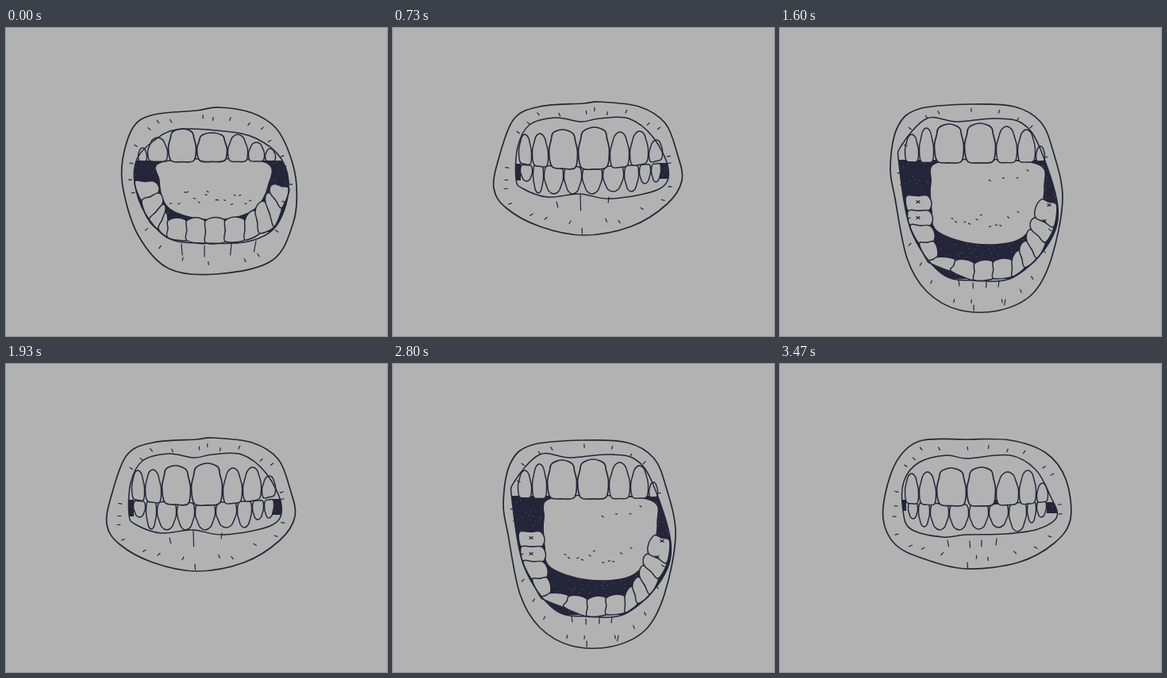
Recreate the animation shown at these times as an HTML page with a canvas. Size 480 px wide and 388 px high, loop 3540 ms.

```html
<!DOCTYPE html>
<html lang="en">
<head>
<meta charset="utf-8">
<title>Mouth</title>
<style>
html, body { margin: 0; width: 100%; height: 100%; overflow: hidden; background: #b2b2b2; }
canvas { display: block; width: 480px; height: 388px; }
</style>
</head>
<body>
<canvas id="stage" width="480" height="388"></canvas>
<script>
const PAPER = '#b2b2b2', INK = '#25253a';
const ctx = document.getElementById('stage').getContext('2d');
ctx.lineCap = ctx.lineJoin = 'round';
let seed = 1;
const rnd = () => (seed = seed * 16807 % 2147483647) / 2147483647;
const mix = (a, b, t) => a + (b - a) * t;

// "a b, c d" -> [[a, b], [c, d]]
const points = text => text.split(',').map(p => p.trim().split(' ').map(Number));

// Smooth line through all points
function trace(pts, closed = true) {
  const n = pts.length;
  const at = i => closed ? pts[(i + n) % n] : pts[Math.max(0, Math.min(n - 1, i))];
  ctx.beginPath();
  ctx.moveTo(...pts[0]);
  for (let i = 0; i < (closed ? n : n - 1); i++) {
    const a = at(i - 1), b = at(i), c = at(i + 1), d = at(i + 2);
    ctx.bezierCurveTo(b[0] + (c[0] - a[0]) / 6, b[1] + (c[1] - a[1]) / 6,
      c[0] - (d[0] - b[0]) / 6, c[1] - (d[1] - b[1]) / 6, c[0], c[1]);
  }
  if (closed) ctx.closePath();
}

function stroke(width) {
  ctx.strokeStyle = INK;
  ctx.lineWidth = width;
  ctx.stroke();
}

function solid(pts, width = 1.5) {
  trace(pts);
  ctx.fillStyle = PAPER;
  ctx.fill();
  stroke(width);
}

function dash(x, y, dx, dy) {
  trace([[x, y], [x + dx, y + dy]], false);
  stroke(1.2);
}

// Dark part of the mouth opening, with a few pale specks
function dark(mouth, x, y, w, h) {
  ctx.save();
  trace(mouth);
  ctx.clip();
  ctx.fillStyle = INK;
  ctx.fillRect(x, y, w, h);
  ctx.fillStyle = '#77778a';
  for (let i = 0; i < w * h / 90; i++) ctx.fillRect(x + rnd() * w, y + rnd() * h, 0.9, 0.9);
  ctx.restore();
}

// Teeth side by side: each has its right edge and the height of its root
function row(left, teeth, bite, sag = 0) {
  const edge = x => bite - sag * ((x - 240) / 90) ** 2;
  for (const [right, root] of points(teeth)) {
    const w = right - left, mid = left + w / 2, h = root - edge(mid);
    const k = w > 30 ? 0.15 : 0.24;
    const p = (u, v) => [left + 0.5 + u * (w - 1), edge(left + u * w) + v * h];
    solid([p(0.1, 0), p(0, 0.4), p(k / 2, 0.7), p(k, 0.9), p(0.5, 1), p(1 - k, 0.9),
      p(1 - k / 2, 0.7), p(1, 0.4), p(0.92, 0), p(0.5, -0.04)], w > 30 ? 1.7 : 1.45);
    left = right;
  }
}

// Teeth around the lower jaw, two between neighbouring gum/bite pairs
function arch(text, count) {
  const ctrl = points(text);
  const at = u => {
    const i = Math.min(Math.floor(u), ctrl.length - 2);
    return ctrl[i].map((v, k) => mix(v, ctrl[i + 1][k], u - i));
  };
  for (let i = 0; i < count; i++) {
    const a = at(i / 2), b = at(i / 2 + 0.5), m = at(i / 2 + 0.25);
    const p = (q, t) => [mix(q[0], q[2], t), mix(q[1], q[3], t)];
    solid([p(a, 0), p(a, 0.5), p(a, 0.92), p(m, 1.08), p(b, 0.92), p(b, 0.5), p(b, 0)], 1.45);
  }
}

// Small hairs just inside the lip outline
function hairs(lip, count) {
  for (let i = 0; i < count; i++) {
    const u = (i + rnd() * 0.7) / count * lip.length, k = Math.floor(u);
    const a = lip[k], b = lip[(k + 1) % lip.length];
    const x = mix(a[0], b[0], u - k), y = mix(a[1], b[1], u - k);
    const dx = 250 - x, dy = 190 - y, d = Math.hypot(dx, dy), gap = 5 + rnd() * 8;
    dash(x + dx / d * gap, y + dy / d * gap, dx / d * 4, dy / d * 4);
  }
}

function creases(text, len) {
  for (const [x, y] of points(text)) dash(x, y, (250 - x) / 25, len);
}

function dots(count, x, y, w, h) {
  for (let i = 0; i < count; i++) dash(x + w * (i + rnd()) / count, y + rnd() * h, 2, rnd() * 3 - 1);
}

// Lips first, then whatever fills the mouth, then the edge of the mouth
function face(lipText, mouthText, inside) {
  const lip = points(lipText), mouth = points(mouthText);
  seed = 11;
  trace(lip);
  stroke(1.7);
  inside(mouth);
  trace(mouth);
  stroke(1.5);
  hairs(lip, 24);
}

const draw = {
  // Open, round
  A() {
    face('161 124, 187 109, 240 104, 268 100, 310 107, 340 126, 357 158, 366 198, 362 245, 335 293, 265 310, 205 303, 167 262, 148 205, 147 165',
      '165 165, 185 143, 215 128, 275 130, 315 139, 347 165, 356 205, 340 250, 305 269, 250 271, 205 265, 175 233, 162 195',
      mouth => {
        dark(mouth, 160, 167, 200, 90);
        solid(points('200 168, 193 192, 203 225, 235 239, 275 241, 312 229, 330 200, 323 168'));
        dots(16, 205, 205, 106, 18);
        arch('162 194 188 193, 180 242 198 221, 204 264 204 241, 252 271 251 241, 301 267 301 240, 338 250 326 217, 357 203 337 196', 12);
        row(166, '178 151, 204 138, 240 127, 279 132, 305 134, 326 144, 340 152', 167);
      });
    creases('221 272, 250 274, 284 272, 315 268', 14);
  },

  // Clenched, wide
  B() {
    face('152 115, 185 99, 240 95, 260 93, 310 99, 343 120, 358 158, 364 192, 345 222, 300 250, 240 261, 185 250, 143 227, 127 202, 133 165',
      '155 190, 157 150, 172 122, 205 113, 237 118, 260 114, 297 114, 328 138, 347 178, 335 203, 275 215, 235 209, 195 213, 163 202',
      mouth => {
        dark(mouth, 150, 171, 11, 21);
        dark(mouth, 336, 170, 14, 20);
        row(160, '176 193, 190 208, 215 209, 238 209, 264 209, 291 206, 310 206, 325 196, 338 194', 176, 4);
        row(158, '175 134, 196 133, 233 128, 273 125, 298 131, 322 130, 340 141', 176, 9);
      });
    creases('236 210', 20);
    creases('272 213, 206 219, 238 252', 7);
  },

  // Slightly parted
  C() {
    face('150 117, 180 97, 222 94, 240 97, 290 96, 330 108, 355 142, 362 182, 347 217, 305 245, 255 259, 205 254, 160 234, 134 208, 133 172',
      '156 172, 160 133, 185 112, 222 115, 240 117, 285 111, 310 124, 350 172, 343 197, 308 218, 250 227, 190 222, 160 195',
      mouth => {
        dark(mouth, 153, 167, 60, 16);
        dark(mouth, 298, 164, 55, 18);
        solid(points('207 168, 236 167, 300 168, 300 178, 214 186'));
        dots(6, 222, 174, 76, 4);
        row(157, '168 203, 179 208, 192 216, 214 220, 239 222, 266 222, 292 219, 314 219, 326 208, 339 200', 182, 5);
        row(157, '177 135, 198 128, 234 124, 273 123, 302 127, 322 126, 336 146', 169, 1);
      });
    creases('239 228, 219 233, 191 227, 274 233, 240 244', 6);
  },

  // Wide open
  D() {
    face('148 125, 175 102, 240 96, 295 99, 328 118, 344 155, 356 215, 342 290, 318 335, 275 356, 225 355, 185 332, 160 290, 145 215, 139 175',
      '150 172, 153 148, 185 114, 222 118, 270 114, 305 120, 327 150, 350 225, 338 272, 294 314, 245 318, 203 309, 165 255',
      mouth => {
        dark(mouth, 145, 166, 210, 150);
        solid(points('203 168, 190 195, 191 230, 198 256, 245 272, 298 268, 324 240, 333 200, 320 170'));
        dots(11, 210, 230, 90, 28);
        dots(4, 262, 178, 56, 18);
        arch('159 212 188 211, 164 249 191 249, 187 295 199 288, 245 318 245 295, 293 313 292 291, 324 290 310 267, 345 250 320 238, 352 196 336 192', 13);
        for (const [x, y] of points('174 219, 174 239, 339 223, 333 243')) {
          dash(x - 2, y - 1.4, 4, 2.8);
          dash(x - 2, y + 1.4, 4, -2.8);
        }
        row(157, '175 134, 194 126, 232 121, 272 120, 299 124, 322 128, 334 149', 168, 1);
      });
    creases('243 321, 260 320, 276 319, 225 318, 244 349, 284 342', 7);
  },

  // Clenched, square
  E() {
    face('152 115, 180 96, 235 95, 290 96, 335 112, 360 145, 366 195, 345 226, 300 250, 235 258, 180 245, 145 227, 130 195, 136 150',
      '155 185, 156 148, 175 124, 210 115, 235 119, 290 115, 322 133, 340 165, 349 192, 325 208, 285 214, 235 215, 205 218, 165 208',
      mouth => {
        dark(mouth, 150, 171, 9, 14);
        dark(mouth, 336, 174, 14, 14);
        dark(mouth, 265, 171, 12, 8);
        row(161, '174 195, 189 205, 213 209, 238 209, 263 208, 288 206, 311 211, 323 200, 336 193', 178, 4);
        row(157, '175 138, 197 136, 235 131, 272 130, 301 136, 323 134, 338 150', 177, 4);
      });
    creases('211 222, 239 223, 254 222, 273 220, 236 250', 8);
  }
};

// Lower-case poses are stretched versions of the same drawing
const stretch = { a: [1.02, 1.11], d: [1.03, 1.02] };
const ORDER = 'AaDdDdDda' + 'ACBEBBCC' + 'ECAadDdD' + 'aACEBBEC' + 'EECAaDdD' + 'dDaACBBE' + 'CECE';
const LOOP = 3540;
let shown = '';

function show(pose) {
  if (pose === shown) return;
  shown = pose;
  const [sx, sy] = stretch[pose] || [1, 1];
  ctx.setTransform(1, 0, 0, 1, 0, 0);
  ctx.fillStyle = PAPER;
  ctx.fillRect(0, 0, 480, 388);
  ctx.setTransform(sx, 0, 0, sy, 250 * (1 - sx), 96 * (1 - sy));
  draw[pose.toUpperCase()]();
}

// 15 drawings a second, switched on whole hundredths
function tick() {
  const hundredths = Math.floor(performance.now() % LOOP / 10);
  show(ORDER[Math.min(ORDER.length - 1, Math.floor((hundredths + 0.34) * 0.15))]);
  requestAnimationFrame(tick);
}
tick();
</script>
</body>
</html>
```
